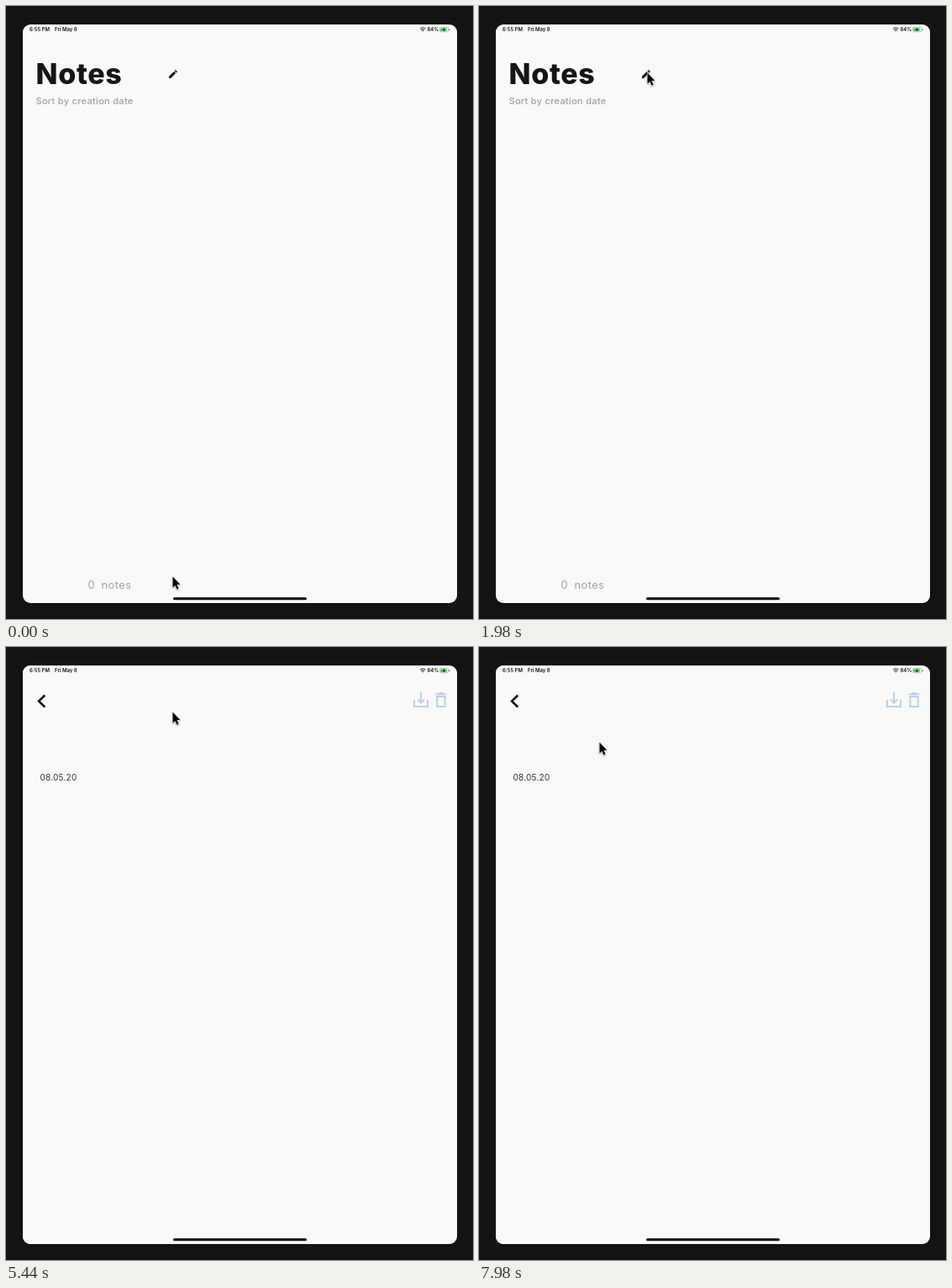
An HTML page that plays this animation: 556 px wide and 730 px high, repeating every 8000 ms.

```html
<!DOCTYPE html>
<html lang="en">
<head>
<meta charset="utf-8">
<title>Notes</title>
<style>
  html, body { margin: 0; width: 100%; height: 100%; overflow: hidden; background: #131313; }
  svg { display: block; font-family: Inter, sans-serif; fill: #151515; }
  .paper { fill: #f9f9f9; }
  .status { font-size: 6px; font-weight: 600; }
  .muted { fill: #a0a0a0; }
  .line { fill: none; stroke-width: 2; }
  #cursor { fill: #000; stroke: #fff; paint-order: stroke; filter: drop-shadow(0 1px 1px #0005); }
</style>
</head>
<body>
<svg width="556" height="730" viewBox="0 0 556 730">
  <defs>
    <clipPath id="screen"><rect x="20" y="22" width="517" height="689" rx="9"/></clipPath>
  </defs>

  <g clip-path="url(#screen)">
    <g id="list">
      <rect class="paper" x="20" y="22" width="517" height="689"/>
      <text x="35.5" y="93" font-size="34" font-weight="800" letter-spacing=".65">Notes</text>
      <text class="muted" x="35.5" y="116.5" font-size="11" font-weight="500" letter-spacing=".3">Sort by creation date</text>
      <path d="M194 86v-2.2l5.9-5.9 2.2 2.2-5.9 5.9zM200.6 77.2l1.2-1.2 2.2 2.2-1.2 1.2z"/>
      <g class="muted" font-size="12.8" letter-spacing=".5">
        <text x="97.5" y="694">0</text>
        <text x="113.5" y="694">notes</text>
      </g>
    </g>

    <g id="detail">
      <rect class="paper" x="20" y="22" width="517" height="689"/>
      <path class="line" d="M46.3 57.5l-7.3 7 7.3 7" stroke="#111" style="stroke-width:2.5"/>
      <g class="line" stroke="#b9d1ea">
        <path d="M486 63v8h16v-8M494 54v12M490 62.5l4 4 4-4"/>
        <path d="M511.5 56.3h13M515.5 55h5M513.3 59h9.4v12h-9.4z"/>
      </g>
      <text x="40.5" y="158.5" font-size="10" letter-spacing=".22" fill="#333">08.05.20</text>
    </g>

    <g class="status">
      <text x="28" y="30.3">6:55 PM</text>
      <text x="58" y="30.3">Fri May 8</text>
      <text x="501.5" y="30.3">84%</text>
    </g>
    <path d="M493 27.2q3.2-2.8 6.4 0M494.3 28.8q1.9-1.7 3.8 0M496.2 29.6v1" fill="none" stroke="#222" stroke-width="1.1"/>
    <rect x="516.4" y="25.4" width="10.4" height="5.4" rx="1.5" fill="none" stroke="#aaa" stroke-width=".7"/>
    <rect x="517.2" y="26.2" width="7.6" height="3.8" rx=".8" fill="#55c865"/>
    <path d="M522 25.5l-2.4 3h1.6l-.6 2.2 2.4-3h-1.6zM527.6 27.2v1.8h.7v-1.8z"/>
    <rect x="199" y="704.2" width="159" height="3" rx="1.5" fill="#080808"/>
  </g>

  <path id="cursor" d="M.5 .5V13.5L3.4 10.9 5.6 15.7 7.6 14.8 5.5 10.1H9.5Z"/>
</svg>

<script>
  const LOOP = 8000, WIDTH = 517;
  const home = { x: 198, y: 679 };
  // Each glide starts where the last one ended; bow bends it to the right.
  const glides = [
    { start: 20, time: 600, x: 211, y: 108, bow: 0 },
    { start: 1520, time: 340, x: 200, y: 79, bow: 20 },
    { start: 2100, time: 240, x: 198, y: 77, bow: 0 },
    { start: 6082, time: 450, x: 143, y: 113, bow: 0 }
  ];
  const [list, detail, cursor] = ["list", "detail", "cursor"].map(id => document.getElementById(id));
  const progress = (t, start, time) => Math.min(1, Math.max(0, (t - start) / time));
  const smooth = k => k * k * (3 - 2 * k);
  const easeOut = k => 1 - (1 - k) ** 3;
  const move = (el, x, y = 0) => el.setAttribute("transform", `translate(${x} ${y})`);

  function pointerAt(t) {
    return glides.reduce((from, { start, time, x, y, bow }) => {
      const k = smooth(progress(t, start, time));
      return {
        x: from.x + (x - from.x) * k + bow * Math.sin(Math.PI * k),
        y: from.y + (y - from.y) * k
      };
    }, home);
  }

  function draw() {
    const t = performance.now() % LOOP;
    const push = easeOut(progress(t, 4940, 400));
    const { x, y } = pointerAt(t);
    move(list, -0.3 * WIDTH * push);
    move(detail, WIDTH * (1 - push));
    move(cursor, x, y);
    requestAnimationFrame(draw);
  }
  draw();
</script>
</body>
</html>
```
